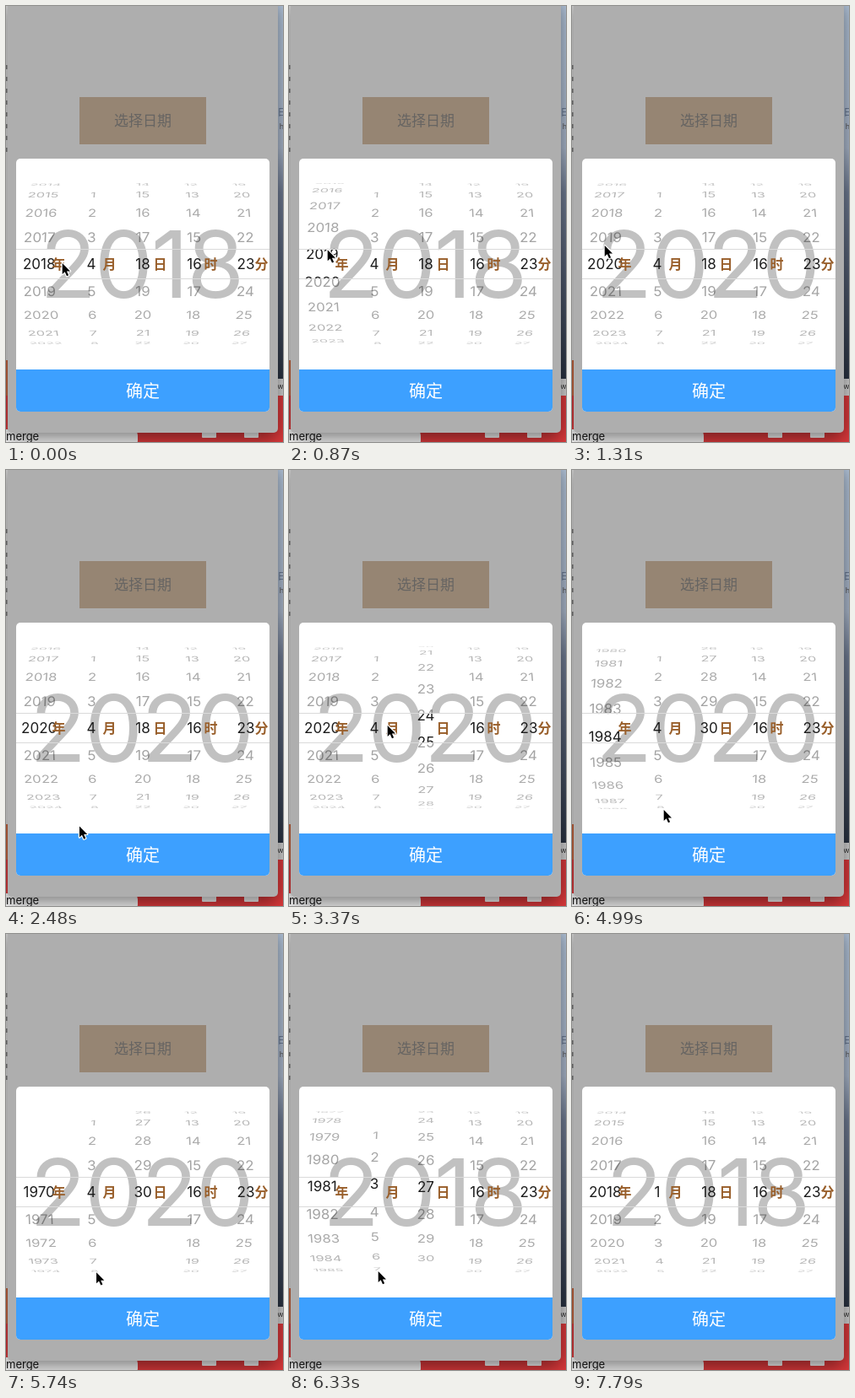
Recreate the animation shown at these times as an HTML page with a canvas. Size 328 by 517 pixels, loop 8000 ms.

```html
<!DOCTYPE html>
<html lang="zh">
<head>
<meta charset="utf-8">
<title>选择日期</title>
<style>
  html, body { margin: 0; width: 100%; height: 100%; overflow: hidden; background: #aeaeae; }
  canvas { display: block; width: 328px; height: 517px; }
</style>
</head>
<body>
<canvas id="stage"></canvas>
<script>
const W = 328, H = 517, LOOP = 8000, STEP = 146.8, LAST = 53;
const MID_X = 162, MID_Y = 306, TOP = 288, BOTTOM = 323;
const RADIUS = 96, TURN = 19.5 * Math.PI / 180, DEPTH = 1100;
const LATIN = 'Inter, Roboto, "Liberation Sans", sans-serif';
const HAN = '"Noto Sans CJK SC", "Noto Sans CJK", sans-serif';

const canvas = document.getElementById('stage');
const ctx = canvas.getContext('2d');
const ratio = window.devicePixelRatio || 1;
canvas.width = W * ratio;
canvas.height = H * ratio;

// Pointer route: [step, x, y]
const ROUTE = [
  [0, 66, 304], [8, 38, 283], [11, 38, 283], [15, 66, 440], [19, 147, 366],
  [21, 180, 290], [23, 116, 302], [27, 33, 308], [30, 34, 343], [32, 72, 426],
  [34, 108, 402], [43, 105, 399], [51, 191, 463], [52, 268, 501]
];

const mix = (a, b, k) => a + (b - a) * k;
const ramp = (n, from, to) => Math.min(1, Math.max(0, (n - from) / (to - from)));
const smooth = (n, from, to) => {
  const p = ramp(n, from, to);
  return p * p * (3 - 2 * p);
};

function box(x, y, w, h, color, radius = 0) {
  ctx.fillStyle = color;
  ctx.beginPath();
  ctx.roundRect(x, y, w, h, radius);
  ctx.fill();
}

function label(text, x, y, size, color, family = LATIN, weight = 400) {
  ctx.font = `${weight} ${size}px ${family}`;
  ctx.fillStyle = color;
  ctx.fillText(text, x, y + size * (family === HAN ? 0.38 : 0.365));
}

function desktop() {
  box(0, 0, W, H, '#dc393b');
  // Window edge on the left
  box(0, 0, 3, 420, '#dedede');
  box(0, 420, 3, 42, '#c9663f');
  for (let y = 70; y < 175; y += 14) box(0, y, 1.5, 5, '#777');
  // Wallpaper and windows on the right
  const sky = ctx.createLinearGradient(0, 0, 0, 442);
  sky.addColorStop(0, '#b4c6dc');
  sky.addColorStop(0.38, '#a9b6ca');
  sky.addColorStop(0.5, '#6f7b92');
  sky.addColorStop(1, '#2a3342');
  box(320, 0, 8, 442, sky);
  label('日', 327, 126, 11, '#5c6d88', HAN);
  label('he', 329, 143, 9, '#555');
  box(320, 442, 8, 20, '#d2d2d2');
  label('w', 325, 451, 9, '#333');
  // Bottom bar
  box(232, 500, 17, 12, '#f2f2f2', 1);
  box(282, 500, 17, 12, '#f2f2f2', 1);
  box(-10, 502, 166, 20, '#f4f4f4', 7);
}

function phone() {
  ctx.save();
  ctx.shadowColor = 'rgba(0,0,0,.5)';
  ctx.shadowBlur = 22 * ratio;
  ctx.shadowOffsetY = 7 * ratio;
  box(2, -10, 320, 516, '#aeaeae', 5);
  ctx.restore();
  ctx.textAlign = 'left';
  label('merge', 0, 510, 13, '#111');
  ctx.textAlign = 'center';
  box(87, 108, 150, 56, '#968573');
  label('选择日期', MID_X, 136, 17, '#666462', HAN);
  box(12, 181, 300, 300, '#fff', 5);
  box(12, 431, 300, 50, '#3da0ff', [0, 0, 5, 5]);
  label('确定', MID_X, 456, 20, '#fff', HAN);
}

function bigYear(year) {
  ctx.letterSpacing = '-2.3px';
  label(year, MID_X - 2, MID_Y, 110, '#c1c1c1');
  ctx.letterSpacing = '0px';
}

function wheel({ x, pos, min, max }, dark) {
  const first = Math.max(min, Math.ceil(pos - 4.6));
  const last = Math.min(max, pos + 4.6);
  for (let v = first; v <= last; v++) {
    const angle = (v - pos) * TURN, c = Math.cos(angle), s = Math.sin(angle);
    if (c < 0.02) continue;
    const near = DEPTH / (DEPTH + RADIUS * (1 - c));
    const slant = (MID_X - x) * near * near * s / DEPTH;
    ctx.save();
    ctx.transform(near, 0, slant, near * c, mix(MID_X, x, near), MID_Y + RADIUS * s);
    label(String(v), 0, 0, 17, dark ? '#1c1c1c' : `rgba(0,0,0,${0.2 + 0.17 * c})`);
    ctx.restore();
  }
}

function wheels(list) {
  const pass = (areas, dark) => {
    ctx.save();
    ctx.beginPath();
    for (const [a, b] of areas) ctx.rect(12, a, 300, b - a);
    ctx.clip();
    list.forEach(w => wheel(w, dark));
    ctx.restore();
  };
  pass([[208, TOP], [BOTTOM, 404]], false);
  pass([[TOP, BOTTOM]], true);
  for (const y of [TOP, BOTTOM]) box(12, y, 300, 1, '#dadada');
  [...'年月日时分'].forEach((unit, i) =>
    label(unit, 62.5 + i * 60, MID_Y, 16, '#995f2b', HAN, 600));
}

function pointer(n) {
  const i = ROUTE.findIndex(p => p[0] >= n);
  if (i < 0) return;
  const b = ROUTE[i], a = ROUTE[Math.max(0, i - 1)];
  const k = i ? ramp(n, a[0], b[0]) : 0;
  ctx.save();
  ctx.translate(mix(a[1], b[1], k) + 0.7, mix(a[2], b[2], k) + 1);
  const arrow = new Path2D('M0 0V13L3 10.2L5.3 15.2L7.4 14.2L5.2 9.4H9.3Z');
  ctx.lineJoin = 'round';
  ctx.lineWidth = 2.4;
  ctx.strokeStyle = '#fff';
  ctx.stroke(arrow);
  ctx.fillStyle = '#000';
  ctx.fill(arrow);
  ctx.restore();
}

function draw(t) {
  // The picture advances in even steps
  const n = Math.min(LAST, Math.floor((t + 12) / STEP));
  const back = smooth(n, 41.4, 46.5);
  const year = 2018 + 2 * smooth(n, 1, 9) - 50 * smooth(n, 29.87, 36.17);
  const day = 18 + 12 * smooth(n, 19, 26.6);
  ctx.setTransform(ratio, 0, 0, ratio, 0, 0);
  ctx.textAlign = 'center';
  desktop();
  phone();
  bigYear(n >= 9 && n < 42 ? '2020' : '2018');
  wheels([
    { x: 39.2, pos: mix(year, 2018, back), min: 1970, max: 2100 },
    { x: 101, pos: mix(4, 1, back), min: 1, max: 12 },
    { x: 162, pos: mix(day, 18, back), min: 1, max: 30 },
    { x: 223, pos: 16, min: 0, max: 23 },
    { x: 284, pos: 23, min: 0, max: 59 }
  ]);
  pointer(n);
}

const start = performance.now();
function tick() {
  draw((performance.now() - start) % LOOP);
  requestAnimationFrame(tick);
}
tick();
</script>
</body>
</html>
```
